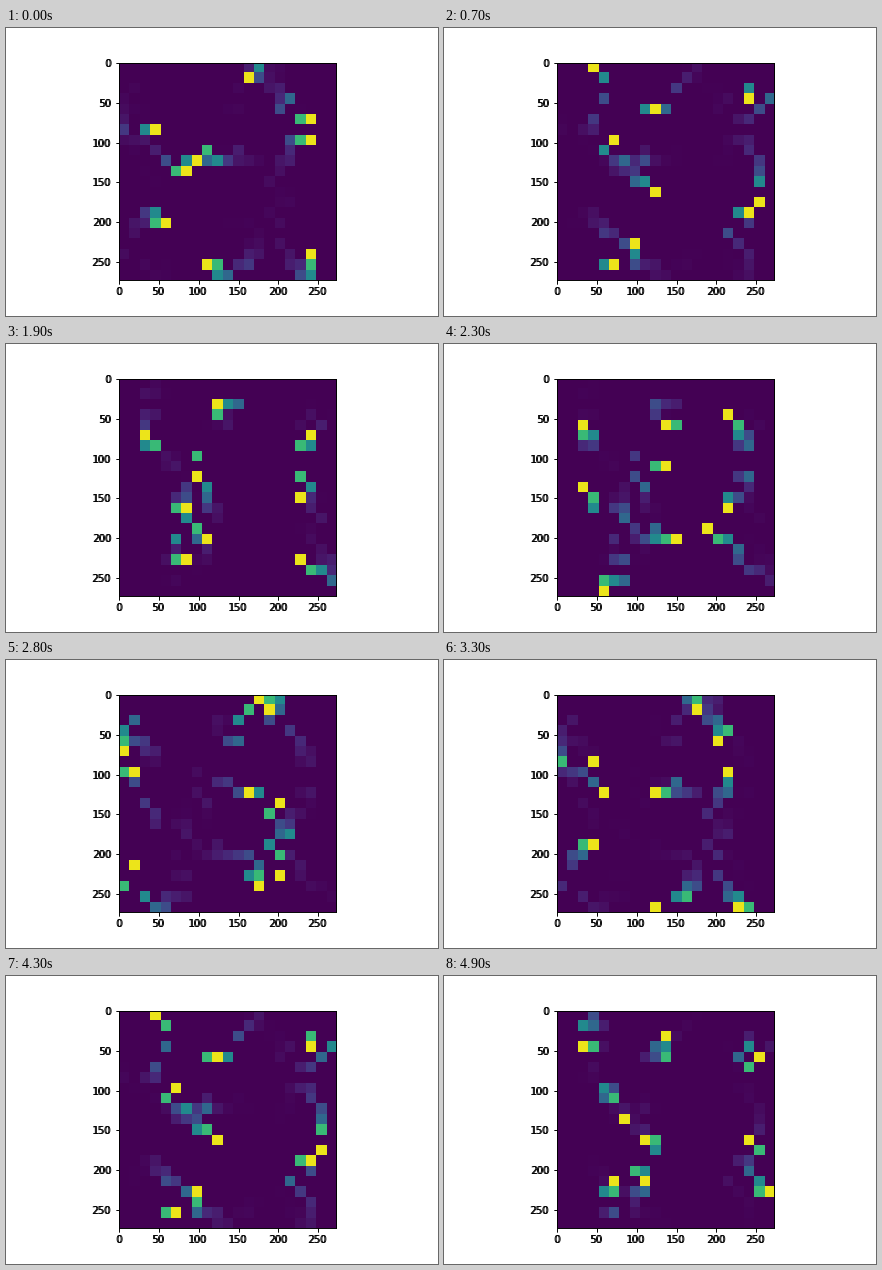
These frames come from a looping animation (432x288 px, 5000 ms). A matplotlib script:

```python
import numpy as np
import matplotlib.pyplot as plt
from matplotlib.animation import FuncAnimation
from matplotlib.transforms import Affine2D

FRAMES, INTERVAL = 50, 100
BLOCK, BLOCKS, CELL = 7, 3, 13
CYCLE = 37      # steps in one tour of a block
WARM_UP = 15    # steps run before the loop so that old trails exist
DECAY = 0.7

plt.rcParams["font.family"] = "DejaVu Sans"
plt.rcParams["font.size"] = 10

# Each block is toured along a closed curve through five stops,
# written as row * 10 + column and reached at the stop times.
STOP_TIMES = (0, 7, 15, 23, 28, CYCLE)
TOURS = np.array([
    (63, 3, 52, 42, 50), (15, 42, 24, 43, 6), (54, 34, 64, 32, 10),
    (36, 5, 46, 32, 1), (20, 52, 41, 13, 25), (4, 65, 34, 52, 31),
    (14, 55, 15, 64, 21), (51, 30, 10, 14, 46), (44, 4, 56, 0, 31),
])
STOPS = TOURS.shape[1]

rng = np.random.default_rng(4)
wobble = rng.normal(0, 0.7, (2, len(TOURS), CYCLE))

# Rows and columns form complex points, joined by a Fourier curve.
harmonics = np.fft.fft(TOURS // 10 + 1j * (TOURS % 10), axis=1) / STOPS
frequencies = np.fft.fftfreq(STOPS, 1 / STOPS)


def active_cells(step):
    """Grid rows and columns of the active cell in every block."""
    step %= CYCLE
    progress = np.interp(step, STOP_TIMES, range(STOPS + 1))
    points = harmonics @ np.exp(2j * np.pi * frequencies * progress / STOPS)
    local = np.array([points.real, points.imag])
    local += wobble[:, :, step] * abs(np.sin(np.pi * progress))
    local = np.clip(np.rint(local), 0, BLOCK - 1).astype(int)
    corner = np.array(np.divmod(np.arange(len(TOURS)), BLOCKS)) * BLOCK
    return tuple(corner + local)


def activity(frame):
    """Fading trails left by the active cells."""
    grid = np.zeros((BLOCK * BLOCKS, BLOCK * BLOCKS))
    for step in range(frame - WARM_UP, frame + 1):
        grid *= DECAY
        grid[active_cells(step)] = 1
    return grid


fig = plt.figure(figsize=(6, 4), dpi=72, facecolor="white")
size = BLOCK * BLOCKS * CELL
low, high = -0.5, size - 0.5


def add_axes(**options):
    ax = fig.add_axes([0.125, 0.125, 0.775, 0.755], **options)
    ax.set(xlim=(low, high), ylim=(high, low), aspect="equal",
           xticks=range(0, size, 50), yticks=range(0, size, 50))
    return ax


ax = add_axes()
image = ax.imshow(activity(0), cmap="viridis", vmin=0, vmax=1.03,
                  extent=(low, high, high, low), interpolation="nearest")

# A second set of labels, one pixel to the left, makes them heavy.
overlay = add_axes(facecolor="none", label="overlay")
for label in overlay.get_xticklabels() + overlay.get_yticklabels():
    label.set_transform(label.get_transform() + Affine2D().translate(-1, 0))


def update(frame):
    image.set_data(activity(frame))
    return [image]


animation = FuncAnimation(fig, update, frames=FRAMES, interval=INTERVAL,
                          repeat=True, repeat_delay=0, blit=False)
plt.show()
```
